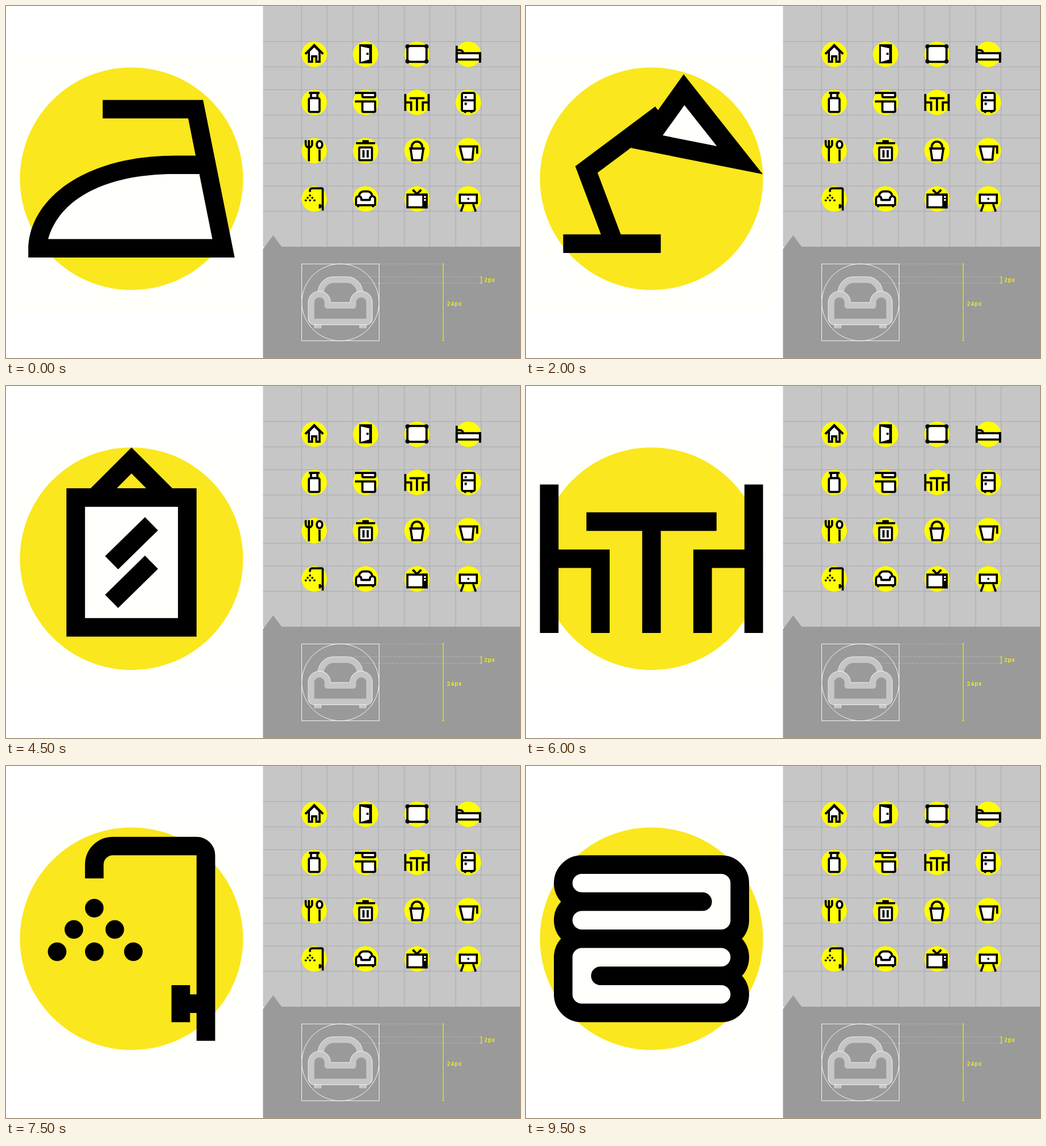
An HTML page for the animation above (10 s loop, 903x620 px).

```html
<!DOCTYPE html>
<html lang="en">
<head>
<meta charset="utf-8">
<title>Home icons</title>
<style>
  html, body { margin: 0; width: 100%; height: 100%; overflow: hidden; background: #fff; }
  svg { display: block; }
  .icon { fill: #fff; stroke: #000; stroke-width: 2; }
  #big .icon { fill: #fffffb; }
  .line { fill: none; }
  .solid { fill: #000; stroke: none; }
  .plain { stroke: none; }
  .round { stroke-linejoin: round; }
  .cap { fill: none; stroke-linecap: round; }
  text { font: 500 9.6px Inter, "Open Sans", sans-serif; letter-spacing: .9px; fill: #ff0; }
</style>
</head>
<body>
<svg id="stage" width="903" height="620" viewBox="0 0 903 620"></svg>
<script>
// Every icon is drawn on a 24 x 24 grid.
const path = (d, cls = '') => `<path class="${cls}" d="${d}"/>`;
const line = d => path(d, 'line');
const solid = d => path(d, 'solid');
const plain = d => path(d, 'plain');
const round = d => path(d, 'round');
const rect = (x, y, w, h, rx = 0, cls = '') =>
  `<rect class="${cls}" x="${x}" y="${y}" width="${w}" height="${h}" rx="${rx}"/>`;
const circle = (x, y, r, cls = '') => `<circle class="${cls}" cx="${x}" cy="${y}" r="${r}"/>`;
const flip = s => `<g transform="matrix(-1 0 0 1 24 0)">${s}</g>`;
const both = s => s + flip(s);
const hanger = '<path class="solid" fill-rule="evenodd" d="M12 0L16.6 4.6H7.4ZM12 2.8L10.4 4.42H13.6Z"/>';

const chairBack = 'M6 13V9A4 4 0 0 1 10 5H14A4 4 0 0 1 18 9V13';
const chairBody = 'M3 12A2.5 2.5 0 0 1 8 12V13H16V12A2.5 2.5 0 0 1 21 12V17A1 1 0 0 1 20 18H4A1 1 0 0 1 3 17Z';
const chairFeet = 'M5 18V20M19 18V20';
const towel = path('M4.5 8A2 2 0 0 1 4.5 4H19.5A2 2 0 0 1 21.5 6V10A2 2 0 0 1 19.5 12H4.5A2 2 0 0 1 4.5 8Z')
  + path('M4.5 8H17.5', 'cap');

const icons = {
  house: path('M7 9V19H10V14H14V19H17V9L12 4Z') + line('M3.6 11.8L12 3.4L20.4 11.8'),
  door: rect(6, 2.6, 12, 18, 0, 'solid') + plain('M7.6 4.6L15.4 6.4V17L7.6 19.2Z') + rect(12.8, 10.6, 2, 2, 0, 'solid'),
  pillow: both(circle(3.3, 4.8, 2.2, 'solid') + circle(3.3, 18.6, 2.2, 'solid')) + rect(3, 4.2, 18, 15, 3),
  bed: line('M1 8H4A3 3 0 0 1 7 11') + rect(1, 11, 22, 6) + line('M1 4V20M23 10V20'),
  jar: rect(9, 3, 6, 5) + line('M7 3H17') + rect(7, 8, 10, 13, 1.3),
  pans: round('M2 3H21V6A1 1 0 0 1 20 7H10A1 1 0 0 1 9 6V3')
    + round('M2 11H21V20A1 1 0 0 1 20 21H10A1 1 0 0 1 9 20V11'),
  table: both(line('M1 4V20M1 12H6.5V20')) + line('M5 8H19M12 8V20'),
  fridge: rect(6, 3, 12, 17, 1.3) + line('M6 10H18M8 21H10M14 21H16M9.5 6V8M9.5 12V14.5'),
  cutlery: line('M4 2V6A3 3 0 0 0 10 6V2M7 2V22M17 11V22') + `<ellipse cx="17" cy="6.3" rx="2.6" ry="3.4"/>`,
  trash: line('M3 5H21M9 3H15') + rect(6, 9, 12, 12, .7) + line('M10 11.5V18.5M14 11.5V18.5'),
  bucket: line('M7 10V8.5A5 5 0 0 1 17 8.5V10') + path('M6 10L7.6 21H16.4L18 10Z') + line('M4.8 10H19.2'),
  jug: path('M4 8L7 20.5H15.8L17 8Z') + line('M17 8H20.3V15'),
  shower: line('M8 5.5V4A2 2 0 0 1 10 2H19A1 1 0 0 1 20 3V23M17 19H20M17.3 17V21')
    + [[8, 8.7], [5.8, 11], [10.2, 11], [4, 13.4], [8, 13.4], [12.2, 13.4]].map(([x, y]) => circle(x, y, 1, 'solid')).join(''),
  armchair: line(chairFeet) + path(chairBack) + round(chairBody),
  tv: line('M8 3.4L12 7.4L16 3.4') + rect(3, 8, 18, 12) + rect(17, 7, 5, 14, 0, 'solid')
    + circle(19.5, 10.2, 1, 'plain') + circle(19.5, 13, 1, 'plain'),
  nightstand: rect(4, 8, 16, 8) + circle(12, 12, 1, 'solid') + both(line('M7.5 17L5 24')),

  iron: solid('M8.9 3.5H19.7L23.1 20.5H.9V19.7C.9 14.5 6.5 9.5 16.85 9.5H18.9L18.1 5.5H8.9Z')
    + plain('M3.03 18.5C4.2 14.3 9 11.5 16.6 11.5H19.3L20.7 18.5Z'),
  washer: rect(4, 2, 16, 20) + line('M4 7H20') + circle(12, 14.5, 4),
  toaster: solid('M6 8V5.3C6 3.2 7 1.7 8.7 2.1L11.3 2.8Q12 3 12.7 2.8L15.3 2.1C17 1.7 18 3.2 18 5.3V8Z')
    + plain('M8 7V5.6C8 4.6 8.2 3.9 8.6 4L11.1 4.75Q12 5 12.9 4.75L15.4 4C15.8 3.9 16 4.6 16 5.6V7Z')
    + solid('M3 21V10.5A3.5 3.5 0 0 1 6.5 7H17.5Q19.8 7 20.7 9H22V11H21V21H19V22H17V21H7V22H5V21Z')
    + rect(5, 9, 14, 10, 1.5, 'plain').replace('/>', ' />') + rect(5, 14, 14, 5, 0, 'plain'),
  pendant: line('M12 0V7') + path('M9 15V16A3 3 0 0 0 15 16V15') + path('M3.8 15A8.2 8.2 0 0 1 20.2 15Z'),
  deskLamp: line('M2.5 19H13M8 19L5 11L13 5') + path('M11.5 8L15.5 2.4L21.5 10Z'),
  tableLamp: line('M12 13V20.5M7 20.5H17') + path('M8 3H16L20 13H4Z'),
  bulb: line('M12 1.5V4.5') + both(line('M3 5.92L5.05 8.03')) + solid('M9 16H15V20A1.5 1.5 0 0 1 13.5 21.5H10.5A1.5 1.5 0 0 1 9 20Z')
    + circle(12, 21, 1.5, 'solid') + circle(12, 12.5, 5) + rect(11, 15.5, 2, 4, 0, 'plain'),
  clock: circle(12, 12, 11) + line('M12 5V12.5L16.5 16'),
  picture: hanger + rect(2.75, 5.42, 18.5, 14) + solid('M5.5 17.5L10 11L13 15L15.5 12L18.5 17.5Z'),
  mirror: hanger + rect(6, 5.4, 12, 14) + line('M14.15 8.22L9.86 12.44M14.15 12.38L9.86 16.6'),
  plate: circle(12, 12, 11) + circle(12, 12, 6),
  sofa: path('M4 13V9A4 4 0 0 1 8 5H16A4 4 0 0 1 20 9V13') + line('M12 5V13M3 18V20M21 18V20')
    + round('M1 12A2.5 2.5 0 0 1 6 12V13H18V12A2.5 2.5 0 0 1 23 12V17A1 1 0 0 1 22 18H2A1 1 0 0 1 1 17Z'),
  towels: towel + `<g transform="rotate(180 12 12)">${towel}</g>`
};

const gridIcons = ['house', 'door', 'pillow', 'bed', 'jar', 'pans', 'table', 'fridge',
  'cutlery', 'trash', 'bucket', 'jug', 'shower', 'armchair', 'tv', 'nightstand'];
const sequence = ['iron', 'washer', 'toaster', 'pendant', 'deskLamp', 'tableLamp', 'bulb',
  'clock', 'picture', 'mirror', 'trash', 'plate', 'table', 'nightstand', 'sofa', 'shower',
  'fridge', 'pans', 'tv', 'towels'];

const place = (name, x, y, scale, attrs = '') =>
  `<g class="icon" transform="translate(${x} ${y}) scale(${scale})" ${attrs}>${icons[name]}</g>`;

function iconGrid() {
  let rules = '', cells = '';
  for (let i = 0; i < 4; i++) {
    const x = 519.3 + i * 90.25, y = 62.6 + i * 84.9;
    rules += `M${x} 0V424M${x + 44.7} 0V424M451.5 ${y}H903M451.5 ${y + 44.5}H903`;
  }
  gridIcons.forEach((name, i) => {
    const x = 519.1 + (i % 4) * 90.25, y = 62.6 + (i >> 2) * 84.9;
    cells += `<circle cx="${x + 22.4}" cy="${y + 22.4}" r="22.4" fill="#ff0"/>` + place(name, x, y, 1.865);
  });
  return `<path d="${rules}" stroke="#a3a3a3" stroke-width=".8"/>` + cells;
}

function blueprint() {
  const part = (d, fill) => `<path d="${d}" fill="${fill}" stroke="#fff" stroke-width="2.1"/>`
    + `<path d="${d}" fill="${fill}" stroke="#c6c6c6" stroke-width="1.86"/>`;
  return `<path d="M451.5 620V428L469.3 404L484.3 424H903V620Z" fill="#9a9a9a"/>
    <g transform="translate(519.5 454.3) scale(5.65)" stroke-linejoin="round">
      ${part(chairFeet, 'none')}${part(chairBack, '#9a9a9a')}${part(chairBody, '#9a9a9a')}
    </g>
    <g fill="none" stroke="#fff" stroke-width=".9">
      <rect x="519.5" y="454.3" width="136" height="135.4"/><circle cx="587.5" cy="522" r="67.8"/>
    </g>
    <path d="M656 454.3H768M600 476.9H835M612 488.2H835" stroke="#bebebe" stroke-width=".8" stroke-dasharray="3 2"/>
    <path d="M768 454V590M766.5 454.3H769.5M766.5 589.6H769.5M835 477V488.5M833.5 477H836.5M833.5 488.3H836.5" stroke="#ff0" stroke-width="1"/>
    <text x="840" y="485.6">2px</text><text x="774.5" y="528.2">24px</text>`;
}

const stage = document.getElementById('stage');
stage.innerHTML = `
  <rect y="84" width="441" height="450" fill="#fffffc"/>
  <circle cx="220.5" cy="304.2" r="196" fill="#fae71d"/>
  <g id="big">${sequence.map(name => place(name, 24.5, 108.3, 16.33, 'display="none"')).join('')}</g>
  <rect x="451.5" width="451.5" height="424.5" fill="#c6c6c6"/>
  ${iconGrid()}${blueprint()}`;

const slides = [...document.getElementById('big').children];
let shown = -1;

function tick() {
  const now = Math.floor(performance.now() % 10000 / 500);
  if (now !== shown) {
    slides.forEach((slide, i) => slide.setAttribute('display', i === now ? 'inline' : 'none'));
    shown = now;
  }
  requestAnimationFrame(tick);
}
tick();
</script>
</body>
</html>
```
